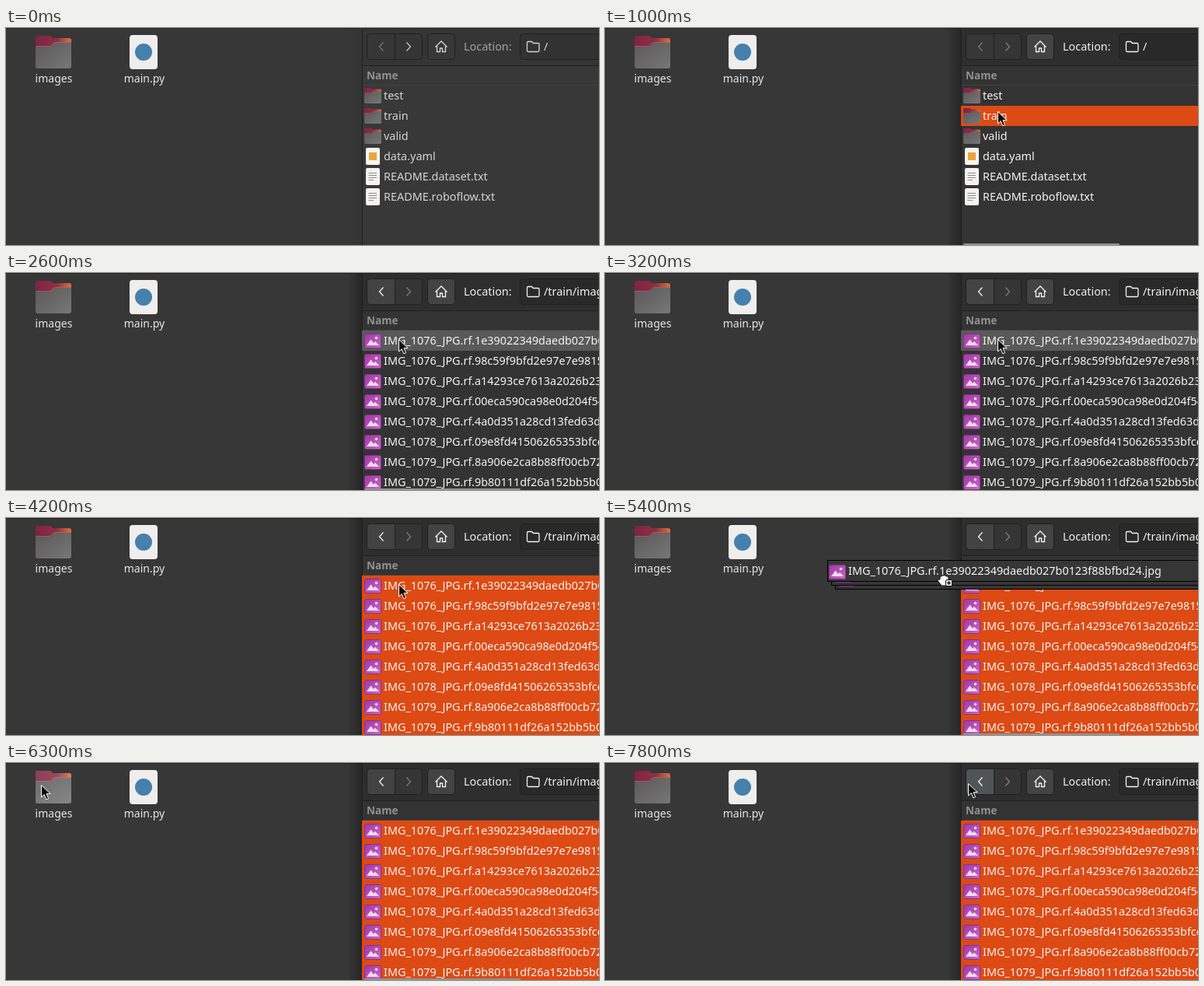
Recreate the animation shown at these times as an HTML page. Size 763 by 279 pixels, loop 8000 ms.

```html
<!DOCTYPE html>
<html lang="en">
<head>
<meta charset="utf-8">
<title>Copying files out of an archive</title>
<style>
html, body { margin: 0; width: 100%; height: 100%; overflow: hidden; background: #373737; }
svg { display: block; width: 763px; height: 279px; font: 14.4px "Noto Sans", "Open Sans", sans-serif; }
text { white-space: pre; }
.a { animation: 8s step-end infinite; }

/* window focus */
#win { color: #d4d4d4; animation-name: ink; }
@keyframes ink { 12.5%, to { color: #f4f4f2; } }
#bar { fill: #353535; animation-name: bar; }
@keyframes bar { 12.5%, to { fill: #2e2e2e; } }
#view { fill: #383838; animation-name: view; }
@keyframes view { 12.5%, to { fill: #333; } }
#entry { fill: #323232; animation-name: entry; }
@keyframes entry { 12.5%, to { fill: #292929; } }
#loc { fill: #a3a3a3; animation-name: loc; }
@keyframes loc { 12.5%, to { fill: #f0f0ee; } }
#home { fill: #383838; animation-name: home; }
@keyframes home { 12.5%, to { fill: #434343; } }
#back { fill: #363636; animation-name: back; }
@keyframes back { 15% { fill: #434343; } 96.25% { fill: #494c4c; } 97.5%, to { fill: #4f5454; } }
#prev { stroke: #777; animation-name: prev; }
@keyframes prev { 15% { stroke: #c8c8c8; } 18.75%, to { stroke: #f2f2f2; } }
#next { stroke: #c4c4c4; animation-name: next; }
@keyframes next { 12.5%, to { stroke: #7c7c7c; } }
#shade { opacity: .15; animation-name: shade; }
@keyframes shade { 12.5%, to { opacity: 1; } }

/* folder contents */
#root { animation-name: root; }
#train { visibility: hidden; animation-name: train; }
#pics { visibility: hidden; animation-name: pics; }
@keyframes root { 15%, to { visibility: hidden; } }
@keyframes train { 15% { visibility: visible; } 32.5%, to { visibility: hidden; } }
@keyframes pics { 32.5%, to { visibility: visible; } }

#mark { fill: #595959; opacity: 0; transform: translateY(100px); animation-name: mark; }
@keyframes mark {
  12.5% { opacity: 1; fill: #dd4a14; transform: translateY(100px); }
  15% { opacity: 1; fill: #595959; transform: translateY(100px); }
  26.25% { opacity: 1; fill: #595959; transform: translateY(74px); }
  31.25% { opacity: 1; fill: #dd4a14; transform: translateY(74px); }
  32.5% { opacity: 1; fill: #595959; transform: translateY(74px); }
  52.5%, to { opacity: 1; fill: #dd4a14; transform: translateY(74px) scaleY(8); }
}
#scroll { opacity: 0; animation-name: scroll; }
@keyframes scroll {
  7.5% { opacity: .4; } 8.75% { opacity: .7; } 10% { opacity: 1; }
  35% { opacity: .8; } 36.25% { opacity: .6; } 37.5% { opacity: .4; } 38.75% { opacity: .2; } 40% { opacity: 0; }
  67.5% { opacity: 1; } 96.25% { opacity: .5; } 97.5%, to { opacity: 0; }
}
#glow { opacity: 0; animation-name: glow; }
@keyframes glow { 73.75% { opacity: .12; } 90%, to { opacity: 0; } }

/* pointer and drag */
#arrow { transform: translate(-40px, -40px); animation-name: arrow; }
@keyframes arrow {
  3.75% { transform: translate(518px, 1px); }
  6.25% { transform: translate(515px, 25px); }
  7.5% { transform: translate(510px, 62px); }
  8.75% { transform: translate(506px, 94px); }
  10% { transform: translate(505px, 107px); }
  26.25% { transform: translate(505px, 95px); }
  27.5% { transform: translate(505px, 85px); }
  67.5% { transform: translate(-40px, -40px); }
  78.75% { transform: translate(45px, 28px); }
  90% { transform: translate(62px, 29px); }
  91.25% { transform: translate(122px, 33px); }
  92.5% { transform: translate(212px, 36px); }
  93.75% { transform: translate(310px, 35px); }
  95% { transform: translate(392px, 31px); }
  96.25% { transform: translate(446px, 28px); }
  97.5%, to { transform: translate(467px, 26px); }
}
#drag { visibility: hidden; animation-name: drag; }
@keyframes drag {
  67.5% { visibility: visible; transform: translate(435px, 73px); }
  68.75% { visibility: visible; transform: translate(352px, 63px); }
  70% { visibility: visible; transform: translate(250px, 51px); }
  71.25% { visibility: visible; transform: translate(150px, 40px); }
  72.5% { visibility: visible; transform: translate(80px, 32px); }
  73.75% { visibility: visible; transform: translate(45px, 29px); }
  78.75%, to { visibility: hidden; transform: translate(45px, 29px); }
}
#stack { animation-name: stack; }
@keyframes stack { 77.5%, to { opacity: 0; } }
</style>
</head>
<body>
<svg viewBox="0 0 763 279">
  <defs>
    <linearGradient id="warm"><stop stop-color="#7d2346"/><stop offset=".6" stop-color="#8f2f42"/><stop offset="1" stop-color="#e0703c"/></linearGradient>
    <linearGradient id="grey" x2="1" y2="1"><stop stop-color="#5b5858"/><stop offset="1" stop-color="#777"/></linearGradient>
    <linearGradient id="plum" x2="1" y2="1"><stop stop-color="#a136a6"/><stop offset="1" stop-color="#c869c4"/></linearGradient>
    <linearGradient id="dark"><stop stop-color="#000" stop-opacity="0"/><stop offset="1" stop-color="#000" stop-opacity=".3"/></linearGradient>
    <symbol id="folder" viewBox="0 0 46 42">
      <path d="M0 3Q0 0 3 0H17Q19 0 20 1L22 3H43Q46 3 46 6V20H0Z" fill="url(#warm)"/>
      <path d="M0 14H17Q19 14 20 13L23 10Q24 9 26 9H46V39Q46 42 43 42H3Q0 42 0 39Z" fill="url(#grey)"/>
      <path d="M0 13.5H17Q19 13.5 20 12.5L23 9.5Q24 8.5 26 8.5H46" fill="none" stroke="#a06b62" stroke-width=".8"/>
    </symbol>
    <symbol id="txt" viewBox="0 0 22 22">
      <rect x="2" width="18" height="22" rx="2" fill="#f3f2f1"/>
      <path d="M5.5 6.5H16M5.5 9.5H16M5.5 12.5H16M5.5 15.5H12" stroke="#8c8c8c"/>
    </symbol>
    <symbol id="yaml" viewBox="0 0 22 22">
      <rect x="2" width="18" height="22" rx="2" fill="#f6f4f0"/>
      <rect x="6" y="6" width="10" height="10" fill="#eba53c"/>
    </symbol>
    <symbol id="pic" viewBox="0 0 22 22">
      <rect x=".5" y="2.5" width="21" height="18" rx="2" fill="url(#plum)" stroke="#84308c"/>
      <path d="M3 17L8.5 9.5L12 14L14 11.8L19 17Z" fill="#f3d9f1"/>
      <circle cx="15.5" cy="7.5" r="1.8" fill="#f3d9f1"/>
    </symbol>
  </defs>

  <!-- desktop -->
  <rect width="763" height="279" fill="#373737"/>
  <g text-anchor="middle" fill="#e6e6e6" font-size="14">
    <use href="#folder" x="38" y="10" width="46" height="42"/>
    <path id="glow" class="a" d="M38 10H57L60 13H84V52H38Z" fill="#fff"/>
    <text x="61.5" y="70">images</text>
    <rect x="159" y="9" width="36" height="44" rx="4" fill="#efeeed"/>
    <circle cx="177" cy="31" r="11" fill="#4680ad"/>
    <text x="178" y="70">main.py</text>
  </g>
  <path d="M0 .5H458" stroke="#232323"/>
  <rect id="shade" class="a" x="440" width="18" height="279" fill="url(#dark)"/>

  <!-- archive window -->
  <g id="win" class="a" fill="currentColor">
    <rect id="view" class="a" x="458" width="305" height="279"/>
    <rect id="bar" class="a" x="458" width="305" height="48"/>
    <path d="M458.5 0V279M458 .5H763M458 48.5H763" stroke="#202020"/>
    <path d="M459 73.5H763" stroke="#424242"/>
    <g stroke="#202020">
      <path id="back" class="a" d="M500.5 7.5H468.5Q464.5 7.5 464.5 11.5V36.5Q464.5 40.5 468.5 40.5H500.5Z"/>
      <path d="M500.5 7.5H531.5Q535.5 7.5 535.5 11.5V36.5Q535.5 40.5 531.5 40.5H500.5Z" fill="#353535"/>
      <rect id="home" class="a" x="542.5" y="7.5" width="35" height="33" rx="4"/>
      <rect id="entry" class="a" x="661.5" y="7.5" width="120" height="33" rx="4"/>
    </g>
    <g fill="none" stroke-width="1.3">
      <path id="prev" class="a" d="M485.5 18.5L480.5 24L485.5 29.5"/>
      <path id="next" class="a" d="M515.5 18.5L520.5 24L515.5 29.5"/>
      <path d="M552.5 24.5L560 17L567.5 24.5M554.5 23V30.5H558.5V26H561.5V30.5H565.5V23" stroke="currentColor"/>
      <path d="M670.5 19Q670.5 17.5 672 17.5H676.5L678.5 19.5H684.5Q686 19.5 686 21V29Q686 30.5 684.5 30.5H672Q670.5 30.5 670.5 29Z" stroke="currentColor"/>
    </g>
    <text id="loc" class="a" x="589" y="29">Location:</text>
    <text x="464" y="66" font-size="13.5" font-weight="700" fill="#929190">Name</text>
    <rect id="mark" class="a" x="458" width="305" height="26"/>
    <g id="root" class="a"></g>
    <g id="train" class="a"></g>
    <g id="pics" class="a"></g>
    <rect id="scroll" class="a" x="461" y="277" width="201" height="2" rx="1" fill="#929292"/>
  </g>

  <!-- dragged rows, placed relative to the hand -->
  <g id="drag" class="a">
    <g id="stack" class="a" fill="#363636" stroke="#000">
      <rect x="-138.5" y="-8.5" width="900" height="27"/>
      <use href="#pic" x="-135" y="-6" width="22" height="22" stroke="none"/>
      <rect x="-143.5" y="-13.5" width="900" height="27"/>
      <use href="#pic" x="-140" y="-11" width="22" height="22" stroke="none"/>
      <rect x="-148.5" y="-18.5" width="900" height="27"/>
      <use href="#pic" x="-147" y="-15" width="22" height="22" stroke="none"/>
      <text x="-122" y="0" fill="#f4f4f2" stroke="none">IMG_1076_JPG.rf.1e39022349daedb027b0123f88bfbd24.jpg</text>
    </g>
    <path d="M-4 4Q-4 1 -2 2Q-1 0 1 1Q3 0 4 2Q7 1 7 4V9Q7 12 5 14H-2Q-4 11 -6 9Q-8 6 -4 6Z" fill="#fff" stroke="#111"/>
    <rect x="3.5" y="6.5" width="8" height="8" rx="1.5" fill="#fff" stroke="#111"/>
    <path d="M5 10.5H10M7.5 8V13" stroke="#111" stroke-width="1.4"/>
  </g>
  <path id="arrow" class="a" d="M.5 .5V16L4.2 12.6L6.8 18.8L9.6 17.6L7 11.6H12.2Z" fill="#0c0c0c" stroke="#fff"/>
</svg>
<script>
const shot = (n, hash) => ['pic', `IMG_${n}_JPG.rf.${hash}`];
const dir = name => ['folder', name];

function fill(id, path, rows) {
  const lines = rows.map(([icon, name], i) => {
    const y = 76 + 26 * i;
    const box = icon === 'folder' ? `y="${y + 1}" height="20"` : `y="${y}" height="22"`;
    return `<use href="#${icon}" x="461" width="22" ${box}/><text x="486" y="${y + 16}">${name}</text>`;
  });
  document.getElementById(id).innerHTML = `<text x="692" y="29">${path}</text>` + lines.join('');
}

fill('root', '/', [
  dir('test'), dir('train'), dir('valid'),
  ['yaml', 'data.yaml'], ['txt', 'README.dataset.txt'], ['txt', 'README.roboflow.txt']
]);
fill('train', '/train/', [dir('images'), dir('labels')]);
fill('pics', '/train/images/', [
  shot(1076, '1e39022349daedb027b0123f'),
  shot(1076, '98c59f9bfd2e97e7e9815c40'),
  shot(1076, 'a14293ce7613a2026b23d71e'),
  shot(1078, '00eca590ca98e0d204f54b82'),
  shot(1078, '4a0d351a28cd13fed63d905a'),
  shot(1078, '09e8fd41506265353bfce317'),
  shot(1079, '8a906e2ca8b88ff00cb72d64'),
  shot(1079, '9b80111df26a152bb5b0e293')
]);
</script>
</body>
</html>
```
